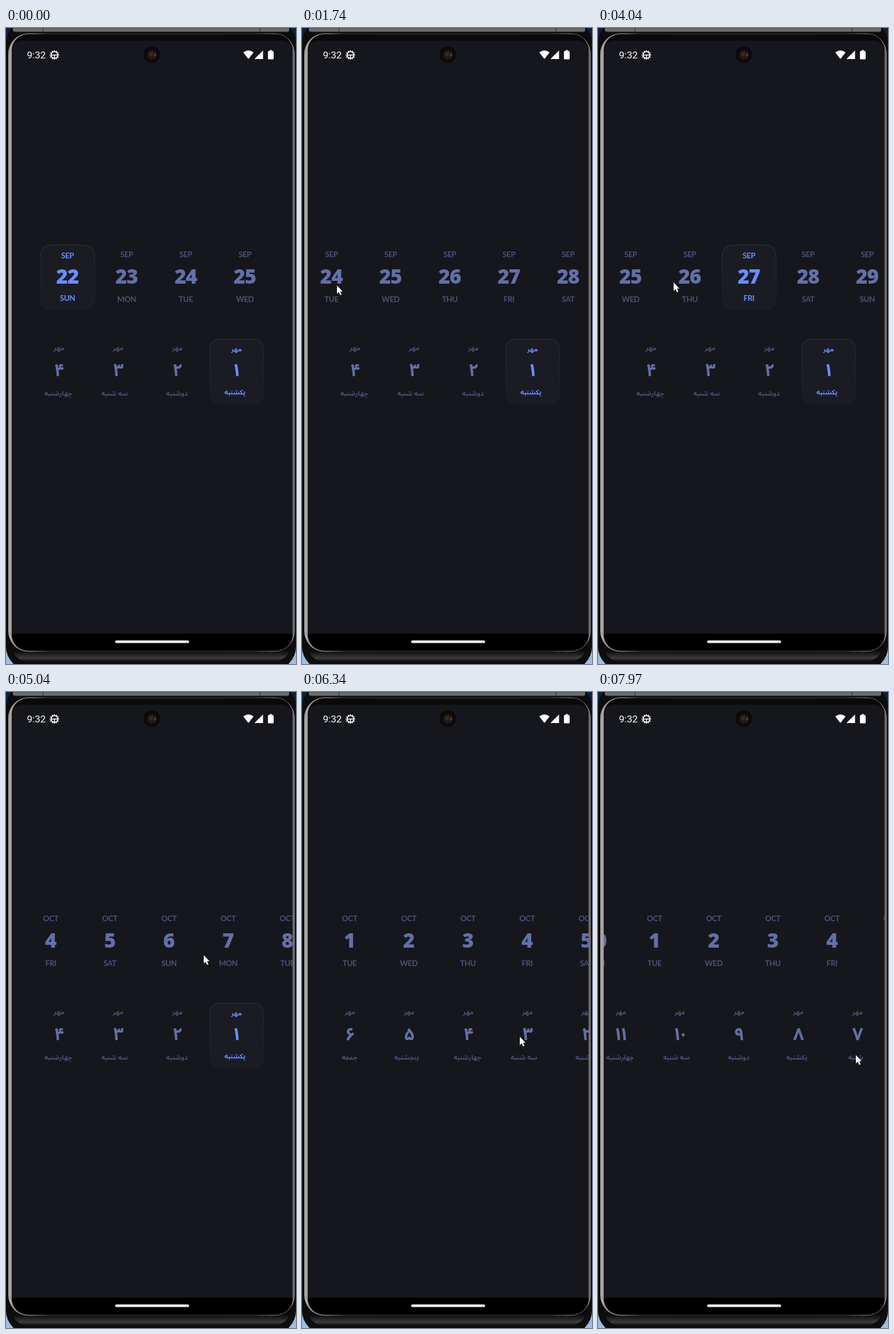
Animation of 506 by 1107 pixels, one loop 8000 ms. Source, as an HTML page with a canvas:

```html
<!DOCTYPE html>
<html lang="en">
<head>
<meta charset="utf-8">
<title>Date pickers</title>
<style>
html, body { margin: 0; width: 100%; height: 100%; overflow: hidden; background: #0b2340; }
canvas { display: block; }
</style>
</head>
<body>
<canvas id="stage" width="506" height="1107"></canvas>
<script>
const ctx = document.getElementById('stage').getContext('2d');
const LOOP = 8000, PITCH = 103.2, FRICTION_MS = 500;
const DAYS = ['SUN', 'MON', 'TUE', 'WED', 'THU', 'FRI', 'SAT'];
const FA_DAYS = ['یکشنبه', 'دوشنبه', 'سه شنبه', 'چهارشنبه', 'پنجشنبه', 'جمعه', 'شنبه'];
const LABEL = '700 13.5px Lato, sans-serif';
const NUMBER = '800 35px "Open Sans", sans-serif';
const FA_FONT = '"Noto Sans Arabic", "DejaVu Sans", sans-serif';

const clamp = u => Math.min(1, Math.max(0, u));
const smooth = u => u * u * (3 - 2 * u);

// A swipe drags the list by `drag`, then lets it glide up to `glide` further until it is stopped.
const topSwipes = [
  { start: 1000, release: 1700, stop: 2400, drag: 255, glide: 92.4 },
  { start: 3956, release: 4270, stop: 5100, drag: 339.4, glide: 768 },
  { start: 5100, release: 5400, stop: 7560, drag: -238.5, glide: -111.5 },
];
const lowSwipes = [{ start: 5920, release: 6400, stop: LOOP, drag: 248, glide: 440.8 }];

function scroll(swipes, t) {
  return swipes.reduce((sum, { start, release, stop, drag, glide }) => {
    const time = release - start, u = clamp((t - start) / time);
    const slide = Math.max(0, Math.min(t, stop) - release);
    // The drag ends at the speed with which the glide begins.
    return sum + drag * smooth(u) - glide * time / FRICTION_MS * u * u * (1 - u)
      + glide * (1 - Math.exp(-slide / FRICTION_MS));
  }, 0);
}

// Pointer moves: start, end, x, y.
const moves = [
  [540, 1000, 323, 442], [1000, 1740, 61, 448], [2100, 2400, 194, 436], [2540, 2600, 201, 445],
  [2870, 3170, 290, 452], [3440, 4040, 132, 443], [4040, 4270, 15, 450], [4270, 4800, 300, 545],
  [4800, 5040, 345, 458], [5100, 5400, 470, 455], [5400, 5900, 183, 589], [5920, 6340, 380, 600],
  [6770, 7570, 400, 541], [7600, 7970, 450, 632],
];

function pointer(t) {
  let x = 470, y = 550;
  for (const [start, end, toX, toY] of moves) {
    const k = smooth(clamp((t - start) / (end - start)));
    x += (toX - x) * k;
    y += (toY - y) * k;
  }
  return [x, y];
}

function text(str, x, y, font, color, align = 'center', spacing = 0) {
  ctx.font = font;
  ctx.fillStyle = color;
  ctx.textAlign = align;
  ctx.letterSpacing = spacing + 'px';
  ctx.fillText(str, x + spacing / 2, y);
}

function box(x, y, w, h, r, fill) {
  ctx.beginPath();
  ctx.roundRect(x, y, w, h, r);
  ctx.fillStyle = fill;
  ctx.fill();
}

function ramp(x0, y0, x1, y1, ...colors) {
  const g = ctx.createLinearGradient(x0, y0, x1, y1);
  colors.forEach((c, i) => g.addColorStop(i / (colors.length - 1), c));
  return g;
}

function shape(path, fill, x = 0, y = 0) {
  ctx.save();
  ctx.translate(x, y);
  ctx.fillStyle = fill;
  ctx.fill(new Path2D(path));
  ctx.restore();
}

function card(x, top) {
  box(x - 48, top, 96, 114, 18, ramp(0, top, 0, top + 114, '#25262f', '#1b1c23'));
  box(x - 46, top + 2, 92, 110, 16, '#1b1c23');
}

const palette = selected => selected ? ['#6c8cff', '#6c8cff'] : ['#49507a', '#646fa6'];

function topDay(i, x, selected) {
  const [label, number] = palette(selected), nudge = selected ? 2 : 0;
  if (selected) card(x, 377);
  text(i < 9 ? 'SEP' : 'OCT', x, 399 + nudge, LABEL, label, 'center', -.4);
  text(i < 9 ? 22 + i : i - 8, x, 445, NUMBER, number, 'center', -1);
  text(DAYS[i % 7], x, 477 - nudge, LABEL, label, 'center', -.4);
}

function lowDay(i, x, selected) {
  const [label, number] = palette(selected), nudge = selected ? 2 : 0;
  if (selected) card(x, 541);
  const digits = String(i + 1).replace(/\d/g, d => String.fromCharCode(0x6f0 + +d));
  text('مهر', x, 561 + nudge, '600 11.5px ' + FA_FONT, label);
  text(digits, x, 606, '700 31px ' + FA_FONT, number);
  text(FA_DAYS[i % 7], x, 640 - nudge, '600 11.5px ' + FA_FONT, label);
}

function gear(x, y) {
  ctx.strokeStyle = '#fff';
  ctx.lineWidth = 1.7;
  ctx.beginPath();
  ctx.arc(x, y, 5.8, 0, 7);
  for (let k = 0; k < 12; k++) {
    const c = Math.cos(k * Math.PI / 6), s = Math.sin(k * Math.PI / 6);
    ctx.moveTo(x + 6 * c, y + 6 * s);
    ctx.lineTo(x + 8.3 * c, y + 8.3 * s);
  }
  ctx.moveTo(x - 5, y);
  ctx.lineTo(x + 5, y);
  ctx.moveTo(x, y);
  ctx.lineTo(x, y + 5);
  ctx.stroke();
}

function phone() {
  ctx.fillStyle = ramp(0, 0, 0, 1107, '#0b2340', '#12365f', '#9fc0e4');
  ctx.fillRect(0, 0, 506, 1107);
  box(0, -14, 506, 1131, 40, '#0d0d0e');
  box(12, -4, 482, 11, 4, ramp(0, 0, 0, 8, '#5c5c5c', '#747474', '#3b3b3b'));
  ctx.fillStyle = '#2b2b2b';
  ctx.fillRect(64, 0, 1, 7);
  ctx.fillRect(443, 0, 1, 7);
  box(8, 1062, 490, 41, [0, 0, 32, 32], ramp(0, 1084, 0, 1103, '#0a0a0a', '#222', '#3c3c3c', '#0d0d0d'));
  box(4, 9, 500, 1077, 36, ramp(4, 0, 504, 0, '#a8a8a8', '#262626', '#222', '#222', '#222', '#222', '#262626', '#707070'));
  box(10, 11, 490, 1073, 28, '#0a0a0a');
  box(121, 10, 264, 2, 1, '#202020');
  box(10, 22, 490, 1060, [20, 20, 28, 28], '#000');
  box(10, 22, 490, 1032, [20, 20, 0, 0], '#16171c');
  box(190.5, 1066, 129, 4.5, 2.25, '#f5f5f5');

  text('9:32', 36.5, 53, '400 17px Roboto, sans-serif', '#fff', 'left');
  gear(84.5, 47);
  box(240, 32, 29, 29, 15, '#0b0b0c');
  box(246, 38, 17, 17, 9, '#211817');
  box(250, 42, 7, 7, 4, '#3a2722');
  box(258, 45, 4, 4, 2, '#633b30');
  shape('M414 42.5Q423 35.5 432 42.5L423 54Z', '#fff');
  shape('M448.5 39V54H433.5Z', '#fff');
  box(457, 40, 10, 14.5, 1.5, '#fff');
  box(460, 38.5, 4, 3, 0, '#fff');
}

function draw() {
  const t = performance.now() % LOOP;
  phone();
  ctx.save();
  ctx.beginPath();
  ctx.rect(10, 22, 490, 1032);
  ctx.clip();
  const chosen = t < 2870 ? 0 : t < 3440 ? 4 : 5;
  const topShift = scroll(topSwipes, t), lowShift = scroll(lowSwipes, t);
  for (let i = 0; i < 20; i++) {
    topDay(i, 107.5 + PITCH * i - topShift, i === chosen);
    lowDay(i, 402.5 - PITCH * i + lowShift, i === 0);
  }
  ctx.restore();
  if (t >= 540) shape('M0 0V14.5L3.4 11.4L5.8 17L8.2 16L5.8 10.5H10Z', '#fff', ...pointer(t));
  requestAnimationFrame(draw);
}
draw();
</script>
</body>
</html>
```
